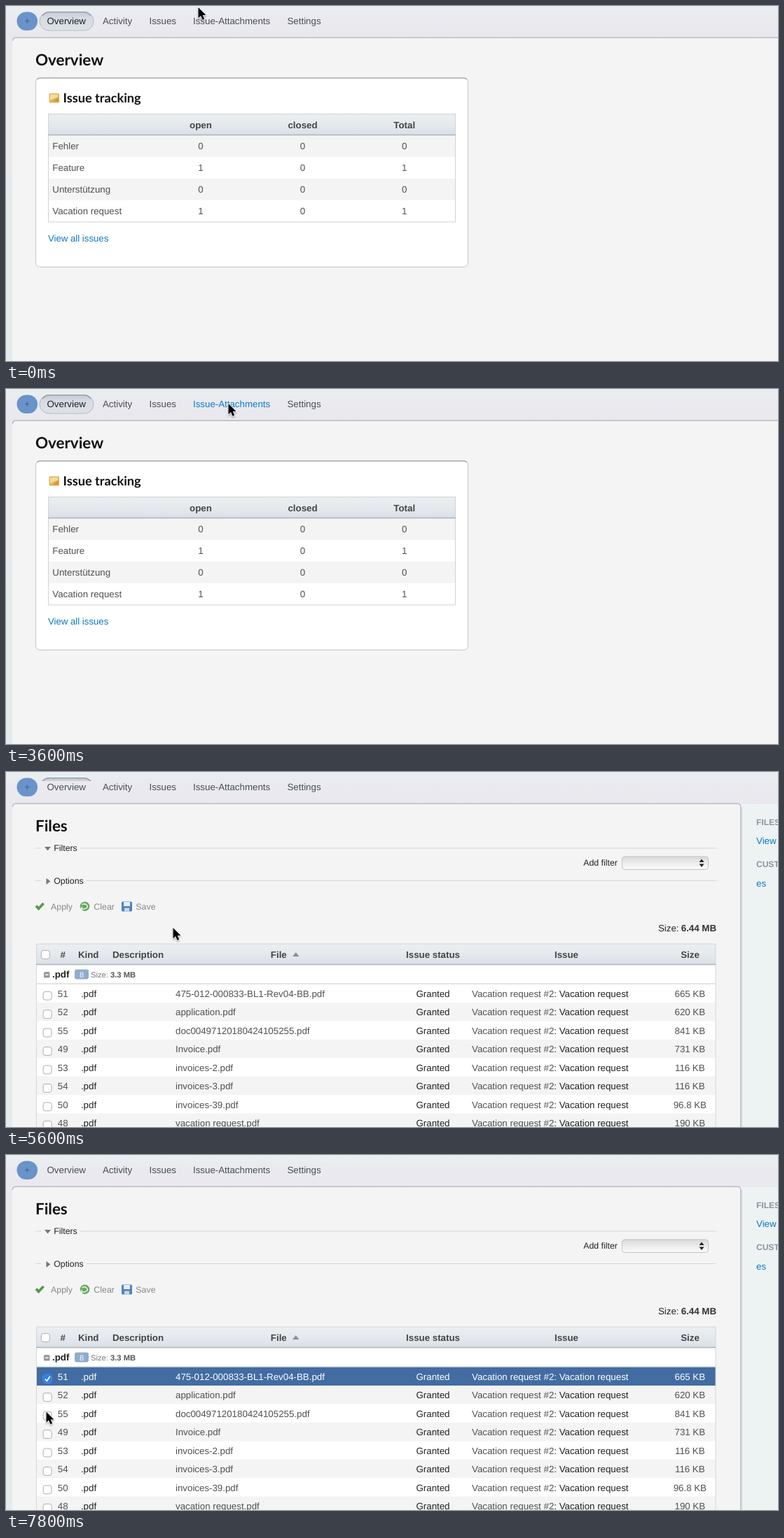
These frames come from a looping animation (1102 px wide and 508 px high, 8 s). An HTML page:

```html
<!DOCTYPE html>
<html lang="en">
<head>
<meta charset="utf-8">
<title>Issue attachments</title>
<style>
  html, body { margin: 0; width: 100%; height: 100%; overflow: hidden; background: #f4f4f4; }
  svg { display: block; width: 1102px; height: 508px; }
  text { font: 13.3px "Liberation Sans", Arial, sans-serif; fill: #505050; white-space: pre; text-rendering: geometricPrecision; }
  .b { font-weight: 700; fill: #444; }
  .h { font: 700 22.4px Lato, sans-serif; fill: #111; }
  .h2 { font: 700 18.2px Lato, sans-serif; fill: #111; }
  .s { font-size: 12.3px; fill: #222; }
  .btn { font-size: 12.4px; fill: #888; }
  .side { font-size: 12px; font-weight: 700; fill: #8b949f; }
  .tiny { font-size: 11.2px; fill: #777; }
  .nav { fill: #484e56; }
  .link { fill: #0a79c0; }
  .dark { fill: #222; }
  .on text, .on tspan { fill: #fff; }
</style>
</head>
<body>
<svg id="stage" viewBox="0 0 1102 508">
  <defs>
    <linearGradient id="bar" x2="0" y2="1">
      <stop offset="0" stop-color="#e8eff0"/><stop offset=".16" stop-color="#e9eef0"/>
      <stop offset=".26" stop-color="#eaeaef"/><stop offset="1" stop-color="#e9e8ee"/>
    </linearGradient>
    <linearGradient id="edge" x2="0" y2="1">
      <stop offset="0" stop-color="#e9e9ee"/><stop offset=".48" stop-color="#e9e9ee"/>
      <stop offset=".56" stop-color="#e4ebed"/><stop offset="1" stop-color="#e4ebed"/>
    </linearGradient>
    <linearGradient id="head" x2="0" y2="1">
      <stop offset="0" stop-color="#eceff1"/><stop offset=".45" stop-color="#e6eaee"/><stop offset="1" stop-color="#d9e0e6"/>
    </linearGradient>
    <linearGradient id="pillFill" x2="0" y2="1">
      <stop offset="0" stop-color="#c3cad2"/><stop offset=".3" stop-color="#d5dbe0"/><stop offset="1" stop-color="#dde2e5"/>
    </linearGradient>
    <linearGradient id="pick" x2="0" y2="1">
      <stop offset="0" stop-color="#d9d9d9"/><stop offset=".5" stop-color="#ececec"/><stop offset="1" stop-color="#fbfbfb"/>
    </linearGradient>
    <clipPath id="pillClip"><rect id="pillCut" x="40" y="0" width="95" height="40"/></clipPath>
    <filter id="shade" x="-50%" y="-50%" width="220%" height="220%">
      <feDropShadow dx="0" dy="1.5" stdDeviation="1.2" flood-opacity=".4"/>
    </filter>
  </defs>
</svg>
<script>
const stage = document.getElementById('stage');

function add(parent, tag, attrs, content) {
  const el = document.createElementNS('http://www.w3.org/2000/svg', tag);
  for (const key in attrs) el.setAttribute(key, attrs[key]);
  if (content !== undefined) el.textContent = content;
  parent.appendChild(el);
  return el;
}
const box = (p, x, y, width, height, fill, extra) => add(p, 'rect', { x, y, width, height, fill, ...extra });
const path = (p, d, fill, extra) => add(p, 'path', { d, fill, ...extra });
const line = (p, d, stroke, width = 1) => path(p, d, 'none', { stroke, 'stroke-width': width });
const label = (p, x, y, str, cls = '', anchor = 'start') =>
  add(p, 'text', { x, y, class: cls, 'text-anchor': anchor }, str);
const mid = (p, x, y, str, cls) => label(p, x, y, str, cls, 'middle');
const check = (p, x, y) => box(p, x + .5, y + .5, 12, 12, '#fff', { rx: 3, stroke: '#adadad' });

// Page frame
box(stage, 0, 0, 1102, 508, 'url(#edge)');
box(stage, 0, 0, 1102, 46, 'url(#bar)');
const overview = add(stage, 'g', {});
const files = add(stage, 'g', {});

// Navigation
const nav = add(stage, 'g', {});
box(nav, 15.5, 8.5, 29.5, 26.5, '#6993c9', { rx: 13.2 });
mid(nav, 30.2, 25.5, '+', 'nav').style.fill = '#3c5f92';
const pill = add(nav, 'g', { 'clip-path': 'url(#pillClip)' });
box(pill, 48, 8.5, 77, 26.5, 'url(#pillFill)', { rx: 13.2, stroke: '#b3bac4' });
path(pill, 'M52 14Q56 8.7 62 8.7H111Q117 8.7 121 14', 'none', { stroke: '#8f98a6', 'stroke-width': 1.2 });
const home = label(nav, 58.5, 26, 'Overview', 'nav');
label(nav, 138, 26, 'Activity', 'nav');
label(nav, 204.5, 26, 'Issues', 'nav');
const attach = label(nav, 267, 26, 'Issue-Attachments', 'nav');
label(nav, 401.5, 26, 'Settings', 'nav');

function drawOverview(g) {
  path(g, 'M9 508V50Q9 45 14 45H1102V508Z', '#f4f4f4');
  line(g, 'M9.5 50Q9.5 45.2 14 45.2H1102', '#b9bac8', 1.4);
  label(g, 42, 85, 'Overview', 'h');
  box(g, 42.5, 103, 617, 270.5, '#fff', { rx: 6, stroke: '#c4c4c4' });
  line(g, 'M44 105Q45.5 103 48 103H654Q656.5 103 658 105', '#999', 1.2);

  box(g, 61.5, 125, 14.5, 13.5, '#e2b45c', { rx: 1.5 });
  path(g, 'M63 126.5H74V131L69 132L63 135Z', '#f5dc9c');
  path(g, 'M67 137L75 130V137Z', '#cf963c');
  label(g, 81.5, 137.5, 'Issue tracking', 'h2');

  box(g, 60, 154, 582, 30.5, 'url(#head)');
  const cols = [278, 423.5, 568.7];
  ['open', 'closed', 'Total'].forEach((s, i) => mid(g, cols[i], 174.8, s, 'b'));
  const rows = [['Fehler', 0, 0, 0], ['Feature', 1, 0, 1], ['Unterstützung', 0, 0, 0], ['Vacation request', 1, 0, 1]];
  rows.forEach(([name, ...counts], i) => {
    const y = 185 + i * 30.9;
    if (i % 2 === 0) box(g, 60, y, 582, 31, '#f4f4f4');
    label(g, 66.3, y + 20.2, name);
    counts.forEach((n, k) => mid(g, cols[k], y + 20.2, n));
  });
  box(g, 60.5, 154.5, 581, 154.5, 'none', { stroke: '#d0d3d6' });
  line(g, 'M60 184.5H642', '#aab3bd', 1.3);
  label(g, 60, 337.3, 'View all issues', 'link').style.fontSize = '13.2px';
}

function drawRow(g, i, [id, name, size]) {
  const y = 303.5 + i * 26.45, base = y + 18.3;
  const row = add(g, 'g', {});
  const back = box(row, 44, y, 969, 26.5, i % 2 ? '#f4f4f4' : '#fff');
  check(row, 52.6, y + 10.2);
  mid(row, 81.2, base, id);
  mid(row, 118, base, '.pdf', 'dark');
  label(row, 242, base, name);
  mid(row, 609.5, base, 'Granted', 'dark');
  const issue = label(row, 665, base, 'Vacation request #2');
  add(issue, 'tspan', { class: 'dark' }, ': Vacation request');
  mid(row, 976.3, base, size + ' KB');
  return { row, back };
}

function drawFiles(g) {
  box(g, 1040, 46, 62, 462, '#edf2f3');
  path(g, 'M9 508V50Q9 45 14 45H1044Q1049 45 1049 50V508Z', '#f4f4f4');
  line(g, 'M1050.2 508V50', '#dadee2', 2);
  line(g, 'M9.5 50Q9.5 45.2 14 45.2H1044Q1048.7 45.2 1048.7 50V508', '#b9bcc8', 1.4);

  label(g, 1071, 75.5, 'FILES', 'side');
  label(g, 1071, 103.2, 'View all', 'link');
  label(g, 1071, 136, 'CUSTOM', 'side');
  label(g, 1071, 164, 'es', 'link');

  label(g, 42, 85, 'Files', 'h');
  line(g, 'M42 109H50M106 109H1014M42 155.5H50M115 155.5H1014', '#d6d6d6');
  path(g, 'M55 107H64L59.5 112.5Z', '#777');
  label(g, 68.3, 113.2, 'Filters', 's');
  path(g, 'M57.5 152V161L63.3 156.5Z', '#777');
  label(g, 68.3, 160.2, 'Options', 's');
  label(g, 824.3, 134, 'Add filter', 's');
  box(g, 879.5, 121, 123, 18.5, 'url(#pick)', { rx: 4, stroke: '#c2c2c2' });
  path(g, 'M989.5 129L993 124.5L996.5 129ZM989.5 131.5L993 136L996.5 131.5Z', '#222');

  line(g, 'M43 191.5L46.5 195.5L53.5 188', '#4f9a4b', 3.6);
  label(g, 64, 196.7, 'Apply', 'btn');
  add(g, 'circle', { cx: 112.5, cy: 192.2, r: 6.8, fill: '#64a862' });
  line(g, 'M108.5 190Q112 187 115.3 190.5T112 196H107M109 193L106.5 196L109 198.5', '#e4f1e0', 1.7);
  label(g, 125.3, 196.7, 'Clear', 'btn');
  box(g, 165, 185.5, 15, 14, '#4f83bd', { rx: 1.5 });
  box(g, 168, 186, 9, 6, '#e6eef7');
  box(g, 169, 194.5, 7, 5, '#c7d8ea');
  label(g, 185.3, 196.7, 'Save', 'btn');

  label(g, 931, 227.7, 'Size:', 'dark');
  label(g, 1014, 227.7, '6.44 MB', 'b', 'end').style.fill = '#333';

  box(g, 44, 246, 969, 29.5, 'url(#head)');
  check(g, 49.8, 254.8);
  [[81.3, '#'], [117.7, 'Kind'], [188.5, 'Description'], [389.3, 'File'], [609.5, 'Issue status'], [800, 'Issue'], [976.5, 'Size']]
    .forEach(([x, s]) => mid(g, x, 265.7, s, 'b'));
  path(g, 'M409 264H418.5L413.7 258Z', '#8a8f95');

  box(g, 44, 276, 969, 27, '#fff');
  box(g, 54, 286, 8.5, 8.5, '#999', { rx: 1.5 });
  line(g, 'M56 290.2H60.5', '#fff', 1.4);
  label(g, 66, 294.3, '.pdf', 'b').style.fill = '#222';
  box(g, 98, 282.5, 20, 14, '#8eadcc', { rx: 3 });
  mid(g, 108, 293.6, '8', 'tiny').style.fill = '#fff';
  label(g, 121, 293.8, 'Size:', 'tiny');
  label(g, 149, 293.8, '3.3 MB', 'tiny b').style.fill = '#555';

  const list = [
    [51, '475-012-000833-BL1-Rev04-BB.pdf', 665], [52, 'application.pdf', 620],
    [55, 'doc00497120180424105255.pdf', 841], [49, 'Invoice.pdf', 731],
    [53, 'invoices-2.pdf', 116], [54, 'invoices-3.pdf', 116],
    [50, 'invoices-39.pdf', 96.8], [48, 'vacation request.pdf', 190]
  ];
  const rows = list.map((item, i) => drawRow(g, i, item));
  line(g, 'M43.5 508V246H1013V508', '#d3d6d9');
  line(g, 'M43 275.5H1013', '#aab3bd', 1.3);
  line(g, 'M43 303H1013', '#c9ccd0');
  return rows[0];
}

drawOverview(overview);
const first = drawFiles(files);
const tick = add(files, 'g', {});
box(tick, 52.6, 313.7, 13, 13, '#2f80f0', { rx: 3 });
line(tick, 'M55.8 320.6L58.4 323.4L62.8 316.8', '#fff', 1.7);

const cursor = path(stage, 'M0 0V15.2L3.5 12L6 17.8L8.7 16.6L6.2 11H11Z', '#000',
  { stroke: '#fff', 'stroke-width': 1.1, 'paint-order': 'stroke', filter: 'url(#shade)' });

// Pointer stops: time, x, y; each holds until the next
const stops = [
  [0, 274.5, 2], [200, 250, 80], [400, 180, 220], [600, 110, 312], [800, 190, 270], [1000, 310, 110],
  [1200, 335, 12], [1400, 317.5, 21], [4800, 315, 32], [5000, 302, 68], [5200, 280, 125], [5400, 256, 185],
  [5600, 238.5, 223], [5800, 196, 272], [6000, 120, 325], [6200, 66, 350], [6400, 56.5, 318.5],
  [7200, 56.5, 322], [7400, 57, 338], [7600, 57.5, 358], [7800, 57.5, 367.5]
];

const show = (el, on) => el.setAttribute('visibility', on ? 'inherit' : 'hidden');

function render(t) {
  const second = t >= 4000, picked = t >= 6800;
  show(overview, !second);
  show(files, second);
  show(pill, t < 6000);
  document.getElementById('pillCut').setAttribute('height', t < 4000 ? 40 : t < 4800 ? 15 : 13);
  home.style.fill = second ? '' : '#222';

  // Link hover fades in over four 200 ms steps
  const k = second ? 0 : Math.min(1, Math.max(0, Math.floor((t - 2800) / 200) / 4));
  const mix = (a, b) => Math.round(a + (b - a) * k);
  attach.style.fill = `rgb(${mix(72, 10)},${mix(78, 125)},${mix(86, 200)})`;

  first.row.setAttribute('class', picked ? 'on' : '');
  first.back.setAttribute('fill', picked ? '#426ca2' : '#fff');
  show(tick, t >= 7000);

  const [, x, y] = stops.findLast(s => s[0] <= t);
  cursor.setAttribute('transform', `translate(${x} ${y})`);
}

function loop() {
  render(performance.now() % 8000);
  requestAnimationFrame(loop);
}
loop();
</script>
</body>
</html>
```
